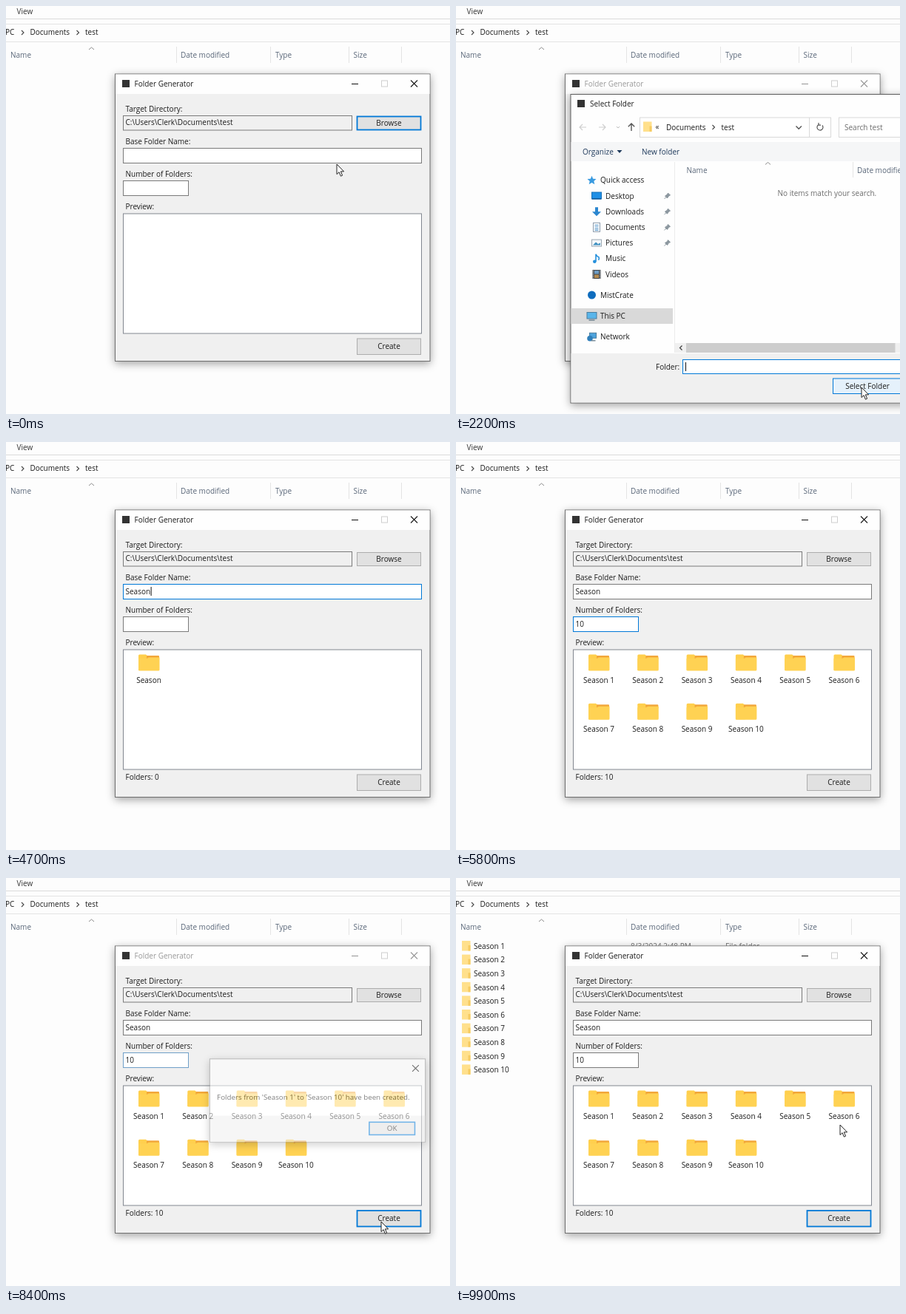
An HTML page for the animation above (10000 ms loop, 600 px wide and 552 px high).

```html
<!DOCTYPE html>
<html lang="en">
<head>
<meta charset="utf-8">
<title>Folder Generator</title>
<style>
  html, body { margin: 0; width: 100%; height: 100%; overflow: hidden; background: #fdfdfd; }
  svg { display: block; width: 600px; height: 552px; }
  text { font: 10px "Open Sans", "Noto Sans", sans-serif; fill: #1c1c1c; white-space: pre; }
  .shadow { filter: drop-shadow(0 3px 6px rgba(0, 0, 0, .36)); }
</style>
</head>
<body>
<svg id="stage" viewBox="0 0 600 552" xmlns="http://www.w3.org/2000/svg"></svg>
<script>
const LOOP = 10000, STEP = 100;
const BLUE = '#0078d7', GREY = '#7a7a7a', HEAD = '#5a6779';

// Markup helpers
const rect = (x, y, w, h, fill, stroke = 'none', more = '') =>
  `<rect x="${x}" y="${y}" width="${w}" height="${h}" fill="${fill}" stroke="${stroke}" ${more}/>`;
const text = (x, y, s, fill = '#1c1c1c', more = '') =>
  `<text x="${x}" y="${y}" style="fill:${fill}" ${more}>${s}</text>`;
const path = (d, stroke, width = 1, fill = 'none', more = '') =>
  `<path d="${d}" stroke="${stroke}" stroke-width="${width}" fill="${fill}" ${more}/>`;
const group = (id, body, more = '') => `<g id="${id}" ${more}>${body}</g>`;
const at = (x, y, body) => `<g transform="translate(${x} ${y})">${body}</g>`;
const mid = 'text-anchor="middle"';
const range = n => [...Array(n).keys()];

const chevron = (x, y) => path(`M${x - 1.5} ${y - 3}l3 3l-3 3`, '#444', 1.1);
const sortMark = (x, y) => path(`M${x - 3.5} ${y + 1.5}l3.5 -3l3.5 3`, '#8a8a8a');
const cross = (x, y) => path(`M${x - 4.5} ${y - 4.5}l9 9m0 -9l-9 9`, 'currentColor', 1.1);
const button = (id, x, y, w, h, label) =>
  rect(x, y, w, h, '#e1e1e1', '#adadad', `id="${id}"`) + text(x + w / 2, y + h / 2 + 3.5, label, '#1c1c1c', mid);
const smallFolder = (x, y) =>
  rect(x, y, 11.5, 13.5, '#ffe08c') + rect(x + 8.5, y + 6, 3, 7.5, '#f6cb62');

function explorer() {
  const heads = [[6, 'Name'], [236, 'Date modified'], [364, 'Type'], [469.5, 'Size']];
  const rows = range(10).map(i => {
    const y = 92 + i * 18.6;
    return smallFolder(8, y - 7) + text(24, y + 3.7, `Season ${i + 1}`) +
      text(236, y + 3.7, '8/3/2024 2:48 PM', '#6d6d6d') + text(364, y + 3.7, 'File folder', '#6d6d6d');
  });
  return rect(0, 0, 600, 552, '#fdfdfd') +
    text(14.5, 11, 'View', '#333') +
    path('M0 17.5H600', '#dadada') + path('M0 24.5H600M0 48.5H600', '#e4e4e4') +
    text(-1, 39.3, 'PC') + chevron(22.5, 36) + text(32.5, 39.3, 'Documents') +
    chevron(97, 36) + text(107, 39.3, 'test') +
    heads.map(([x, s]) => text(x, 70, s, HEAD)).join('') +
    path('M230.5 55V77M357.5 55V77M463.5 55V77M534.5 55V77', '#e4e4e4') + sortMark(115.5, 57.5) +
    group('list', rows.join(''));
}

function previewItem(i) {
  const x = 193 + (i % 6) * 66.3, y = 287 + Math.floor(i / 6) * 66.3;
  return at(x, y, path('M-14 22V2Q-14 .5 -12.5 .5H-4L-1 3V22Z', 'none', 0, '#ffcf4d') +
    rect(-3, 2, 17, 6, '#f2a73b', 'none', 'rx="1"') +
    path('M-14 6H-3L0 4.5H14.5V21Q14.5 22.5 13 22.5H-12.5Q-14 22.5 -14 21Z', 'none', 0, '#ffd253') +
    text(0, 38.5, '', '#1c1c1c', mid));
}

function generator() {
  const labels = [[142.6, 'Target Directory:'], [186.8, 'Base Folder Name:'],
    [231, 'Number of Folders:'], [275.3, 'Preview:']];
  return rect(147.5, 92, 425.5, 388.5, '#f0f0f0', '#6e6e6e', 'class="shadow"') +
    rect(148, 92.5, 424.5, 26.5, '#fefefe') +
    rect(157, 100, 10, 10, '#333') +
    group('caption', text(173.5, 108.7, 'Folder Generator', 'currentColor') +
      path('M467 105.5h9', 'currentColor', 1.1) + cross(551.5, 105)) +
    rect(507.5, 101, 8, 8, 'none', '#cfcfcf') +
    labels.map(([y, s]) => text(161.5, y, s)).join('') +
    rect(158.5, 148.5, 309, 19.5, '#f0f0f0', GREY) +
    text(161.5, 161.3, 'C:\\Users\\Clerk\\Documents\\test') +
    button('browse', 474.5, 149.5, 86, 18, 'Browse') +
    rect(158.5, 192.5, 403, 20, '#fff', GREY, 'id="base"') + text(161.5, 205.8, '', '#1c1c1c', 'id="baseText"') +
    rect(158.5, 236.5, 88, 20, '#fff', GREY, 'id="num"') + text(161.5, 250, '', '#1c1c1c', 'id="numText"') +
    rect(0, 0, 1, 12, '#111', 'none', 'id="caret"') +
    rect(158.5, 281, 403, 162, '#fff', '#828790') +
    group('items', range(10).map(previewItem).join('')) +
    text(161.5, 457, '', '#1c1c1c', 'id="count"') +
    button('create', 474.5, 450, 86, 21.5, 'Create');
}

const icons = {
  star: path('M0 -6L1.7 -2L6 -1.6L2.8 1.3L3.8 5.6L0 3.3L-3.8 5.6L-2.8 1.3L-6 -1.6L-1.7 -2Z', 'none', 0, '#3a9be0'),
  desktop: rect(-6.5, -5, 13, 9, '#1f8fe6', '#1670b8') + rect(-6, 3, 12, 1.5, '#0f5b9c'),
  down: path('M-2 -6H2V0H6L0 6L-6 0H-2Z', 'none', 0, '#2b86cf'),
  doc: rect(-4.5, -6, 9, 12, '#fff', '#8b9bab') + path('M-2.5 -3h5m-5 2.5h5m-5 2.5h5m-5 2h5', '#4a90c8'),
  picture: rect(-6.5, -4.5, 13, 9, '#f4f8fb', '#9aa7b2') + path('M-5 3L-1 -1L2 1.5L5 0V3Z', 'none', 0, '#3d8fc0'),
  music: path('M-1 4V-6Q0 -3 3 -2Q4 0 2.5 2', '#2590dc', 1.6) + '<circle cx="-2.7" cy="4" r="2.3" fill="#2590dc"/>',
  film: rect(-5.5, -6, 11, 12, '#3c4248') + rect(-3, -5, 6, 4.5, '#6d9cc4') + rect(-3, .5, 6, 4.5, '#b58b4f') +
    path('M-4.3 -5V6M4.3 -5V6', '#ddd', 1, 'none', 'stroke-dasharray="1.3"'),
  dot: '<circle r="5.5" fill="#0f6cbd"/>',
  pc: rect(-6.5, -5, 13, 8.5, '#59b5ea', '#4a7d9e') + path('M-4 5.5h8', '#6a7f8d', 1.4),
  net: rect(-3, -5.5, 9, 7, '#4ea3dc', '#4a7d9e') + '<circle cx="-2.5" cy="2" r="3.8" fill="#2f7fba"/>' + path('M-1 5h6', '#6a7f8d', 1.3)
};
const pin = path('M1 -4L4 -1L2 0L0 3L-3 0L0 -2ZM-1.5 1.5L-4 4', '#8c979f', 1, '#8c979f');

function picker() {
  const subs = [['desktop', 'Desktop'], ['down', 'Downloads'], ['doc', 'Documents'],
    ['picture', 'Pictures'], ['music', 'Music'], ['film', 'Videos']];
  const roots = [['star', 'Quick access', 235.7], ['dot', 'MistCrate', 391], ['pc', 'This PC', 419.5], ['net', 'Network', 447.8]];
  return rect(155, 119.5, 510, 417.5, '#fefefe', '#5c5c5c', 'class="shadow"') +
    rect(164, 127, 10, 10, '#333') + text(181, 135.8, 'Select Folder') +
    path('M176 164h-9m4 -4l-4 4l4 4M193 164h9m-4 -4l4 4l-4 4', '#cfcfcf', 1.2) +
    path('M217 163l2 2l2 -2', '#bbb') + path('M237 169v-10m-4.2 4.2l4.2 -4.2l4.2 4.2', '#555', 1.4) +
    rect(248.5, 151, 258, 26.5, '#fff', '#d9d9d9') + path('M477.5 151V177.5', '#d9d9d9') +
    smallFolder(253, 156.5) + text(269.5, 167, '«') + text(284, 167.5, 'Documents') + chevron(348, 164) + text(358.5, 167.5, 'test') +
    path('M459.5 162.5l3.7 3.7l3.7 -3.7', '#555', 1.4) +
    path('M495 161.5A4 4 0 1 1 490 160.6M490 158v3.2h3', '#555', 1.2) +
    rect(517.5, 151, 140, 26.5, '#fff', '#d9d9d9') + text(525, 167.5, 'Search test', '#6d6d6d') +
    rect(155.5, 184, 509, 26, '#f5f6f7') + text(171, 200.5, 'Organize', '#1e395b') +
    path('M217.5 195h7l-3.5 4Z', 'none', 0, '#1e395b') + text(251, 200.5, 'New folder', '#1e395b') +
    rect(302, 212, 234, 19, '#d9ebf9', 'none', 'id="headHover"') +
    path('M295.5 211V469', '#ececec') + path('M536.5 211V232', '#e4e4e4') +
    text(311.5, 226, 'Name', HEAD) + sortMark(421.5, 213) + text(542, 226, 'Date modified', HEAD) +
    text(434.5, 256.8, 'No items match your search.', '#6d6d6d') +
    rect(155.5, 409, 137.5, 21, '#d9d9d9') +
    roots.map(([k, s, y]) => at(183.5, y, icons[k]) + text(195, y + 3.5, s)).join('') +
    subs.map(([k, s], i) => {
      const y = 257 + i * 21.2;
      return at(190, y, icons[k]) + text(202, y + 3.5, s) + (i < 4 ? at(285.5, y, pin) : '');
    }).join('') +
    rect(296, 456, 368.5, 13, '#f0f0f0') + rect(311, 456, 282.5, 13, '#cdcdcd') +
    path('M305.5 459.5l-3 3l3 3', '#444', 1.3) +
    rect(155.5, 470, 509, 66.5, '#f0f0f0') + text(270, 492, 'Folder:') +
    rect(306.5, 478.5, 350, 19, '#fff', BLUE) + rect(310, 482, 1, 12, '#111', 'none', 'id="pickCaret"') +
    button('select', 509.5, 504, 93, 20.5, 'Select Folder');
}

function message() {
  return rect(272, 243.5, 298, 115, '#fff', '#8a8a8a', 'class="shadow"') +
    rect(272.5, 322, 297, 36, '#f0f0f0') + cross(556.5, 256.5) +
    text(282, 300, "Folders from 'Season 1' to 'Season 10' have been created.") +
    rect(492.5, 331, 63, 17.5, '#e1e1e1', BLUE, 'stroke-width="1.6" id="ok"') +
    text(524, 343.3, 'OK', '#1c1c1c', mid);
}

const stage = document.getElementById('stage');
stage.innerHTML = explorer() + group('generator', generator()) + group('picker', picker()) + group('message', message()) +
  group('pointer',
    path('M0 0V13.6L3.1 10.7L5.4 16.2L7.6 15.2L5.3 9.9H9.6Z', '#222', 1, '#fff', 'id="arrow"') +
    path('M-3 -7.5H-1L0 -6.5L1 -7.5H3M0 -6.5V6.5M-3 7.5H-1L0 6.5L1 7.5H3', '#222', 1, 'none', 'id="beam"'));
const ui = {};
stage.querySelectorAll('[id]').forEach(el => ui[el.id] = el);
const items = [...ui.items.children];

// Time, then values at that time
const pointerKeys = [[0, 447, 214], [150, 447, 214], [500, 512, 160], [750, 512, 160], [1000, 514, 241],
  [1800, 548, 516], [2400, 548, 516], [3000, 330, 203], [4800, 330, 203], [5200, 205, 247],
  [6200, 205, 247], [6800, 174, 321], [7000, 174, 321], [7700, 507, 465], [8400, 507, 465],
  [8900, 519, 336], [9900, 519, 334]];
const pickerKeys = [[900, 0], [1000, .25], [1100, .8], [1200, 1], [2400, 1], [2500, .4], [2600, 0]];
const messageKeys = [[8300, 0], [8400, .55], [8500, 1], [9200, 1], [9300, .4], [9400, 0]];

function sample(keys, t) {
  const i = keys.findIndex(k => k[0] > t);
  if (i < 0) return keys[keys.length - 1].slice(1);
  if (i === 0) return keys[0].slice(1);
  const a = keys[i - 1], b = keys[i], p = (t - a[0]) / (b[0] - a[0]), e = p * p * (3 - 2 * p);
  return a.slice(1).map((v, j) => v + (b[j + 1] - v) * e);
}

const within = (t, a, b) => t >= a && t < b;
const show = (el, on) => el.style.display = on ? '' : 'none';
const paint = (el, attrs) => Object.entries(attrs).forEach(([k, v]) => el.setAttribute(k, v));

function popup(el, amount, cx, cy) {
  const s = .95 + .05 * amount;
  show(el, amount > 0);
  paint(el, { opacity: amount, transform: `translate(${cx * (1 - s)} ${cy * (1 - s)}) scale(${s})` });
}

function paintButton(el, focused, hover, thin) {
  paint(el, {
    fill: hover ? '#e5f1fb' : '#e1e1e1',
    stroke: focused || hover ? BLUE : '#adadad',
    'stroke-width': focused && !thin ? 1.8 : 1
  });
}

function render(t) {
  const [pick] = sample(pickerKeys, t), [msg] = sample(messageKeys, t), [x, y] = sample(pointerKeys, t);
  const focus = t < 3100 ? 'browse' : t < 5200 ? 'base' : t < 8200 ? 'num' : 'create';
  const name = 'Season'.slice(0, Math.max(0, Math.floor((t - 3600) / 120) + 1));
  const digits = t < 5400 ? '' : t < 5600 ? '1' : '10';
  const n = Number(digits);

  popup(ui.picker, pick, 405, 302);
  popup(ui.message, msg, 421, 301);
  ui.caption.style.color = pick || msg ? '#999' : '#1c1c1c';
  show(ui.list, t >= 9400);
  show(ui.headHover, t < 1200);
  show(ui.pickCaret, t % 1000 < 500);

  ui.baseText.textContent = name;
  ui.numText.textContent = digits;
  ui.count.textContent = name && `Folders: ${n}`;
  items.forEach((el, i) => {
    show(el, name && i < Math.max(1, n));
    el.lastElementChild.textContent = n ? `${name} ${i + 1}` : name;
  });

  paint(ui.base, { stroke: focus === 'base' ? BLUE : GREY });
  paint(ui.num, { stroke: focus === 'num' ? BLUE : within(t, 8200, 8600) ? '#6f9fc8' : GREY });
  paintButton(ui.browse, focus === 'browse', within(t, 500, 800), pick > 0);
  paintButton(ui.create, focus === 'create', within(t, 7600, 8200));
  paintButton(ui.select, false, within(t, 1700, 2600));
  paint(ui.ok, { fill: within(t, 8900, 9400) ? '#e5f1fb' : '#e1e1e1' });

  const field = focus === 'base' ? ui.baseText : ui.numText;
  show(ui.caret, focus === 'base' || focus === 'num' && t % 1000 < 500);
  paint(ui.caret, { x: 162 + field.getComputedTextLength(), y: focus === 'base' ? 196 : 240.5 });

  const overField = within(t, 2900, 5000) || within(t, 5100, 6400);
  show(ui.pointer, !within(t, 3600, 4800) && !within(t, 5400, 6200));
  show(ui.beam, overField);
  show(ui.arrow, !overField);
  paint(ui.pointer, { transform: `translate(${x} ${y})` });
}

const start = performance.now();
function tick() {
  const t = (performance.now() - start) % LOOP;
  render(Math.floor(t / STEP) * STEP);
  requestAnimationFrame(tick);
}
tick();
</script>
</body>
</html>
```
